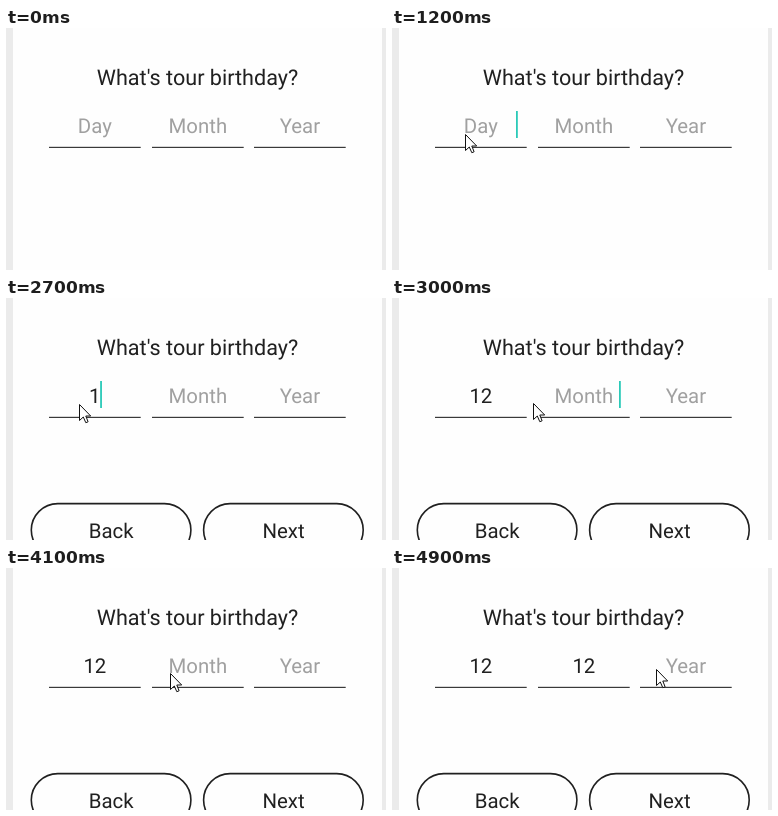
Recreate the animation shown at these times as an HTML page with a canvas. Size 380 by 242 pixels, loop 5000 ms.

```html
<!DOCTYPE html>
<html lang="en">
<head>
<meta charset="utf-8">
<title>Birthday form</title>
<style>
  html, body { margin: 0; width: 100%; height: 100%; overflow: hidden; background: #fefefe; }
  canvas { display: block; width: 380px; height: 242px; }
</style>
</head>
<body>
<canvas id="stage" width="380" height="242"></canvas>
<script>
const ctx = document.getElementById('stage').getContext('2d');
const LOOP = 5000, STEP = 100;
const INK = '#202020', HINT = '#a0a0a0', TEAL = '#2bcab8';
const FIELD_W = 91.7, TEXT_SIZE = 20.4;

// focus: caret arrives; typed: first digit, the second follows one step later
const fields = [
  { x: 43, hint: 'Day', focus: 1200, typed: 2700 },
  { x: 146, hint: 'Month', focus: 2800, typed: 4600 },
  { x: 248, hint: 'Year', focus: 4700, typed: Infinity }
];

// Pointer moves, each easing out from the place before it
const entry = { x: 26, y: 135 };
const moves = [
  { start: 100, end: 600, x: 73, y: 106 },
  { start: 2800, end: 3200, x: 164, y: 105 },
  { start: 4700, end: 4900, x: 264, y: 101 }
];

const clamp = v => Math.min(1, Math.max(0, v));
const easeOut = p => 1 - (1 - p) ** 2;
const caretLit = t => t < 4100 || (t >= 4600 && t < 4900);

function pointerAt(t) {
  let { x, y } = entry;
  for (const m of moves) {
    const p = easeOut(clamp((t - m.start) / (m.end - m.start)));
    x += (m.x - x) * p;
    y += (m.y - y) * p;
  }
  return [Math.round(x), Math.round(y)];
}

function label(str, x, y, size, color) {
  ctx.font = `${size}px Roboto, sans-serif`;
  ctx.textRendering = 'geometricPrecision';
  ctx.textAlign = 'center';
  ctx.fillStyle = color;
  ctx.fillText(str, x, y);
}

function drawField(f, t) {
  const mid = f.x + FIELD_W / 2;
  const digits = t < f.typed ? 0 : t < f.typed + STEP ? 1 : 2;
  label('12'.slice(0, digits) || f.hint, mid, 105, TEXT_SIZE, digits ? INK : HINT);
  ctx.fillStyle = '#3a3a3a';
  ctx.fillRect(f.x, 118.8, FIELD_W, 1.2);
  if (t >= f.focus && digits < 2 && caretLit(t)) {
    ctx.fillStyle = TEAL;
    ctx.fillRect(digits ? mid + 5.3 : f.x + 81, 83, 1.8, 27);
  }
}

function drawButton(x, str) {
  ctx.beginPath();
  ctx.roundRect(x, 205.6, 159.6, 53, 26.5);
  ctx.lineWidth = 1.6;
  ctx.strokeStyle = INK;
  ctx.stroke();
  label(str, x + 79.9, 239.5, TEXT_SIZE, INK);
}

function drawPointer(x, y) {
  ctx.save();
  ctx.translate(x + 0.5, y + 0.5);
  const arrow = new Path2D('M0 0V16L3.8 12.5 6.3 18.2 8.6 17.3 6.3 11.5H11.2Z');
  ctx.fillStyle = '#fff';
  ctx.fill(arrow);
  ctx.lineWidth = 1;
  ctx.strokeStyle = '#111';
  ctx.stroke(arrow);
  ctx.restore();
}

function draw(t) {
  ctx.fillStyle = '#fefefe';
  ctx.fillRect(0, 0, 380, 242);
  ctx.fillStyle = '#ebebeb';
  ctx.fillRect(0, 0, 7, 242);
  ctx.fillRect(376, 0, 4, 242);

  label("What's tour birthday?", 191.5, 57.4, 21.6, INK);
  for (const f of fields) drawField(f, t);
  if (t >= 1300) {
    drawButton(25.3, 'Back');
    drawButton(197.6, 'Next');
  }
  if (t >= moves[0].start) drawPointer(...pointerAt(t));
}

const origin = performance.now();
function tick() {
  const t = (performance.now() - origin) % LOOP;
  draw(Math.floor(t / STEP) * STEP);
  requestAnimationFrame(tick);
}
tick();
</script>
</body>
</html>
```
